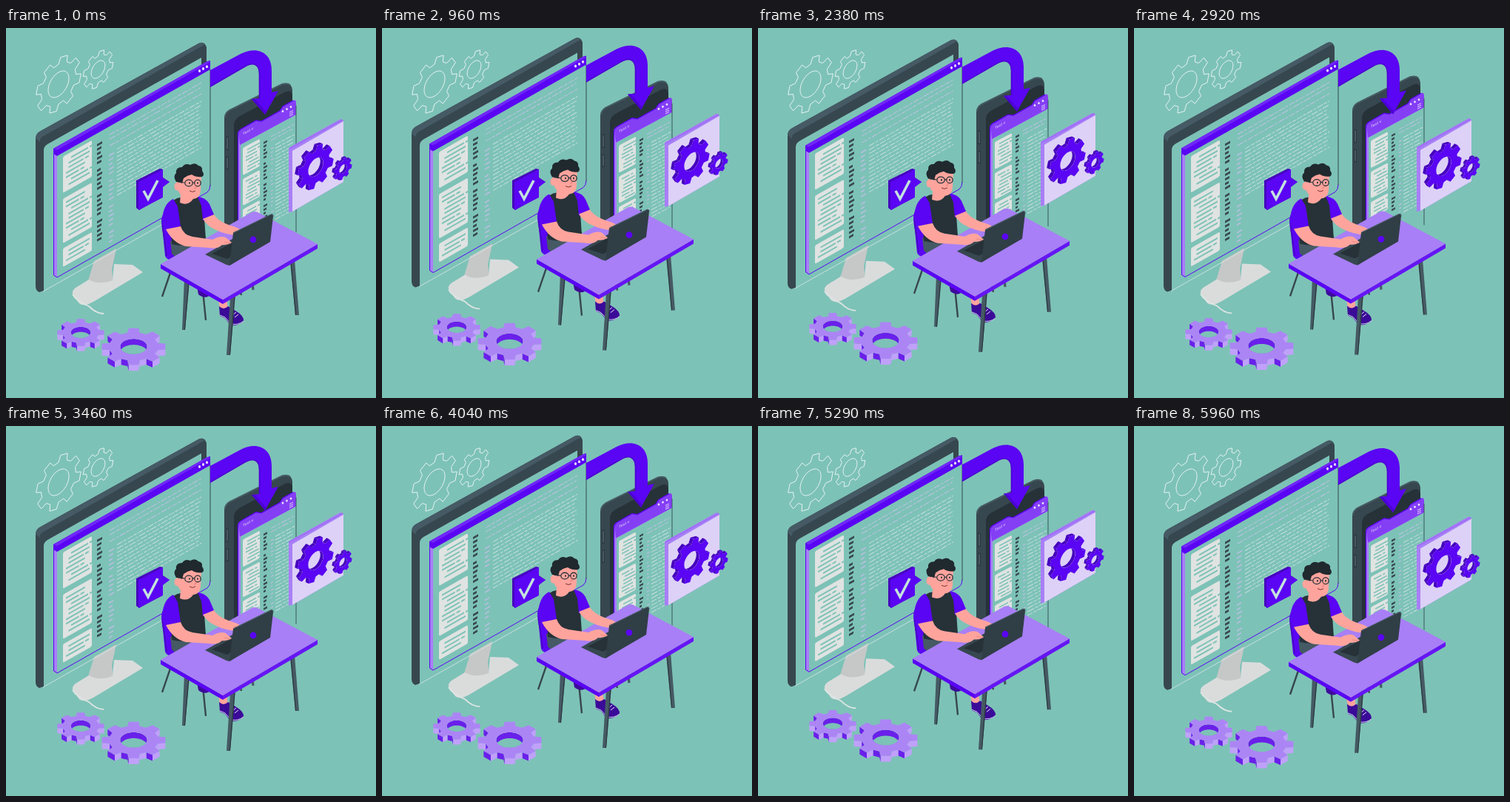
Write an HTML page with a canvas that moves like this. It is 500 by 500 pixels and loops after 6 s.

```html
<!DOCTYPE html>
<html lang="en">
<head>
<meta charset="utf-8">
<title>Developer at work</title>
<style>
html, body { margin: 0; width: 100%; height: 100%; overflow: hidden; background: #7dc2b7; }
canvas { display: block; width: 500px; height: 500px; }
</style>
</head>
<body>
<canvas id="stage" width="500" height="500"></canvas>
<script>
const c = document.getElementById('stage').getContext('2d');
const BG = '#7dc2b7', VIOLET = '#5a05f3', DEEP = '#4503bd', LILAC = '#a87ff6', PALE = '#ddd1f7',
  DARK = '#263238', SLATE = '#37474f', STEEL = '#455a64', SKIN = '#ffa49d', PAPER = '#dfe3e1';
const WALL = [.87, -.5, 0, 1], FLOOR = [.87, -.5, .87, .5];

const fill = (d, color) => { c.fillStyle = color; c.fill(new Path2D(d)); };
const line = (d, color, width = 1) => {
  c.strokeStyle = color;
  c.lineWidth = width;
  c.stroke(new Path2D(d));
};
const oval = (x, y, rx, ry, color) => {
  c.beginPath();
  c.ellipse(x, y, rx, ry, 0, 0, 7);
  c.fillStyle = color;
  c.fill();
};
const box = (x, y, w, h, color, r = 0) => {
  c.beginPath();
  c.roundRect(x, y, w, h, r);
  c.fillStyle = color;
  c.fill();
};

// Draws in a frame whose x axis climbs along the isometric wall.
function onWall(x, y, draw, slope = -.567) {
  c.save();
  c.transform(1, slope, 0, 1, x, y);
  draw();
  c.restore();
}

// Draws with a linear up-and-down drift of 10 px.
function float(t, period, draw) {
  c.save();
  c.translate(0, -10 * (1 - Math.abs(1 - 2 * (t / period % 1))));
  draw();
  c.restore();
}

function ring(cx, cy, m, polar) {
  return polar.map(([r, a]) => {
    const u = r * Math.cos(a), v = r * Math.sin(a);
    return [cx + m[0] * u + m[2] * v, cy + m[1] * u + m[3] * v];
  });
}
const toPath = pts => 'M' + pts.map(p => p.join(' ')).join('L') + 'Z';

function gearShape(cx, cy, r, m, hole, turn) {
  const teeth = 8, step = 2 * Math.PI / teeth, rim = [], bore = [];
  for (let i = 0; i < teeth; i++)
    for (const [k, s] of [[-.32, .77], [-.2, 1], [.2, 1], [.32, .77]])
      rim.push([r * s, (i + k) * step + turn]);
  for (let i = 0; i < 40; i++) bore.push([r * hole, i * Math.PI / 20]);
  return [ring(cx, cy, m, rim), ring(cx, cy, m, bore)];
}

function solidGear(cx, cy, r, m, turn, [ex, ey], face, light, dark, back) {
  const [rim, bore] = gearShape(cx, cy, r, m, .42, turn);
  rim.forEach((p, i) => {
    const q = rim[(i + 1) % rim.length];
    const nx = q[1] - p[1], ny = p[0] - q[0];
    if (nx * ex + ny * ey > 0)
      fill(toPath([p, q, [q[0] + ex, q[1] + ey], [p[0] + ex, p[1] + ey]]), nx < -1 ? dark : light);
  });
  const hole = toPath(bore);
  c.save();
  c.clip(new Path2D(hole));
  fill(hole, dark);
  c.translate(ex, ey);
  fill(hole, back);
  c.restore();
  c.fillStyle = face;
  c.fill(new Path2D(toPath(rim) + hole), 'evenodd');
}

function lineGear(cx, cy, r) {
  gearShape(cx, cy, r, WALL, .46, .25).forEach(p => line(toPath(p), '#e6f3f1', 1));
}

// A sheet of short text bars.
function note(x, y, w, h, gap, seed) {
  box(x, y, w, h, PAPER, 2);
  for (let i = 0, yy = y + gap; yy < y + h - 3; i++, yy += gap) {
    const k = (i + seed) * 7 % 5, left = x + 4 + (k % 3) * w * .09;
    const len = w * (.45 + k * .07);
    box(left, yy, len, gap * .38, BG);
    if (k < 3) box(left + len + 2, yy, w * .13, gap * .38, BG);
  }
}

function marks(x, y, w, n, step, color, h) {
  for (let i = 0; i < n; i++)
    box(x, y + i * step + Math.floor(i / 5) * step * .7, w - i % 3, h, color);
}

// Rows of broken thin text lines.
function rules(x, y, w, n, step, color = '#d3e4e6') {
  c.save();
  for (let i = 0; i < n; i++) {
    c.setLineDash([7 + i % 3, 1.5, 4, 1.5]);
    line(`M${x} ${y + i * step}h${w - i * 5 % 4}`, color, .9);
  }
  c.restore();
}

function monitor() {
  fill('M110 345 L119 315 L149 298 L143 326 L145 343 L120 350Z', '#c6c8c8');
  fill('M90 359 Q89 355 94 351 L112 340 Q125 348 144 341 L146 319 L171 320 L185 330 L118 370 Q104 378 98 371Z', '#dadcdc');
  line('M90 360 Q95 369 112 376 Q122 386 132 386', '#dfe6e4', 1.8);
  fill('M40 151 Q40 143 47 139 L260 21 Q268 17 271 26 L271 47 L264 50 L264 40 L56 157 Q51 160 51 165 L51 355 L45 357 Q40 355 40 349Z', SLATE);
  fill('M40 149 Q40 142 47 139 L260 21 Q266 18 269 22 L49 147 Q45 150 46 154Z', STEEL);
  line('M50 356 L226 257', '#d8e9e6', .8);

  fill('M64 163 L69 171 L69 337 L64 334Z', LILAC);
  line('M64.5 164 V334 L69 337 L272 222 Q276 219 276 212', VIOLET, 1);
  line('M276 56 V213', '#354d59', 1);
  fill('M64 163 L272 45 L276 44 L276 56 L69 173 L64 170Z', VIOLET);
  fill('M64 163 L272 45 L276 46 L69 165Z', '#7027f7');
  for (let i = 0; i < 3; i++) oval(261.5 + i * 5, 58 - i * 2.9, 1.6, 2, '#e9e0fc');

  onWall(77, 174, () => {
    note(0, 0, 39, 49, 5.8, 1);
    note(0, 57, 39, 60, 5.8, 4);
    note(0, 124, 39, 25, 5.8, 2);
    marks(46, 9, 7, 20, 6.1, SLATE, 3);
    rules(63, 6, 124, 2, 6, '#cbc3ec');
    rules(63, 21, 124, 1, 5, '#cbc3ec');
    marks(62, 33, 7, 18, 6.1, '#b4bfdd', 2);
    rules(73, 31, 114, 13, 5.2);
  });
}

function check() {
  fill('M176 206 L208 190 L212 191 L212 202 L221 208 L212 214 L212 228 L180 246 L176 243Z', DEEP);
  fill('M179 208 L212 191 L212 203 L221 208 L212 215 L212 229 L179 246Z', VIOLET);
  line('M186 220 L192 231 L205 206', '#c3e2de', 3.6);
}

function phone() {
  fill('M295 122 Q295 115 302 111 L373 76 Q386 72 387 84 L387 100 L316 145 V290 H295Z', SLATE);
  fill('M308 130 Q309 123 316 119 L376 87 Q386 82 387 92 L387 104 L316 145 V290 H308Z', DARK);
  line('M296 121 Q296 115 302 111 L373 76 Q380 74 384 77', STEEL, 2);
  line('M299 147 V165 M299 174 V191', DARK, 4);
  line('M299 148 V164 M299 175 V190', STEEL, 2.4);

  fill('M316 145 L392 105 V290 H316Z', BG);
  fill('M313 143 Q313 139 317 137 L338 125 L345 126 L370 112 L374 106 L388 98 Q392 96 392 102 L392 117 L317 158 V290 H313Z', LILAC);
  fill('M314 142 Q314 139 317 137 L338 125 L345 126 L370 112 L374 106 L388 98 Q392 96 392 102 L392 117 L316 158Z', '#843ff5');
  line('M313.5 290 V143 Q314 139 317 137 L338 125 L345 126 L370 112 L374 106 L388 98', VIOLET, 1.3);
  line('M392 105 V276', '#354d59', .9);
  for (let i = 0; i < 3; i++) oval(374 + i * 5.5, 112.5 - i * 3, 1.3, 1.5, '#eee6fd');
  line('M383 114 l5 -2.5 M383 116.5 l5 -2.5 M383 119 l5 -2.5', '#eee6fd', .9);
  onWall(320, 145, () => {
    c.fillStyle = '#eee6fd';
    c.font = '5px Inter, sans-serif';
    c.fillText('Text v', 0, 0);
  });
  onWall(320, 162, () => {
    note(0, 0, 23, 37, 4.6, 2);
    note(0, 42, 23, 36, 4.6, 0);
    note(0, 83, 23, 22, 4.6, 3);
    marks(28, 7, 5, 19, 5, SLATE, 2.6);
    rules(38, 5, 31, 2, 5, '#cbc3ec');
    marks(38, 21, 4, 18, 5, '#b4bfdd', 1.5);
    rules(44, 19, 26, 22, 4.8);
  }, -.53);
}

function arrow() {
  fill('M276 57 L317 35 C338 24 359 32 359 57 L359 87 L368 85 L350 117 L332 96 L342 95 V62 C342 50 335 45 323 52 L276 80Z', VIOLET);
  line('M276 79 L323 52 C335 45 342.5 50 342.5 62 V95', '#4c03d2', 1.6);
  fill('M332 96 L336 96 L352 114 L350 117Z', '#4c03d2');
}

function head() {
  fill('M231 205 C230 216 233 222 236 225 L235 236 Q246 241 253 231 C260 230 263 226 263 217 L264 198 L240 196Z', SKIN);
  oval(231.5, 214, 4, 5.5, SKIN);
  fill('M230 208 Q225 200 230 196 Q229 188 238 188 Q242 182 249 185 Q256 181 260 186 Q266 187 265 193 Q269 198 265 201 Q257 202 251 198 Q245 199 240 203 L238 210 L234 208Z', '#1f292e');
  c.strokeStyle = DARK;
  c.lineWidth = 1.3;
  for (const [x, r] of [[247, 5.2], [259, 4.2]]) {
    c.beginPath();
    c.ellipse(x, 209.5, r, 4.3, 0, 0, 7);
    c.stroke();
  }
  line('M252 209 L255 209 M241 209 L232 208', DARK, 1.2);
  oval(248, 209.5, 1, 1.3, DARK);
  oval(259, 209.5, 1, 1.3, DARK);
  line('M255 211 L257 216 L254 217', '#e0736f', .8);
  line('M248 220 Q252 223 256 220', '#7e3535', 1);
}

function personAndDesk() {
  // chair, lower legs and far table leg
  line('M223 328 L211 363 M266 355 L270 395 M315 348 L318 361', SLATE, 2.4);
  line('M332 335 L334 354', STEEL, 3.2);
  fill('M213 252 Q208 255 212 278 L215 308 Q218 316 232 313 L228 270Z', VIOLET);
  line('M213 253 Q209 257 214 284 L217 308', DEEP, 1.5);
  fill('M258 349 L278 359 Q270 368 260 360Z', '#3d0a9c');
  fill('M286 361 L298 366 L300 380 L289 379Z', SKIN);
  fill('M288 376 Q294 382 300 376 L310 382 Q322 389 321 396 Q312 404 303 401 L296 392 L289 389Z', '#3a0b98');
  line('M289 388 L296 391 L304 400 Q314 402 321 396', '#d9ccf6', 1);
  line('M302 386 L308 381 M305 389 L311 384 M309 391 L314 387', '#eee6fd', 1);

  // body
  fill('M222 288 L270 282 L272 305 L238 318 L224 305Z', STEEL);
  fill('M221 240 Q226 230 236 229 Q246 236 256 228 Q265 229 267 242 L270 286 Q246 298 224 292Z', DARK);
  fill('M226 231 Q213 237 211 258 Q211 268 215 273 L236 268 L232 241Z', VIOLET);
  fill('M259 228 Q270 229 275 238 L281 252 Q275 260 266 260 L264 240Z', VIOLET);
  head();

  // table
  fill('M241 338 L248 342 L242 408 L238 408Z', STEEL);
  fill('M303 364 L310 360 L303 442 L298 442Z', STEEL);
  fill('M384 316 L390 313 L396 388 L391 388Z', STEEL);
  line('M247 342 L241.5 408 M309 362 L302.5 442 M385 316 L391.5 388', DARK, 1);
  fill('M209 319 L293 367 V373 L209 325Z', VIOLET);
  fill('M293 367 L421 292 V298 L293 373Z', '#6615f4');
  fill('M209 319 L332 249 Q336 247 340 249 L421 292 L293 367Z', LILAC);

  // laptop and arms
  fill('M269 306 L306 285 L344 294 L302 321 L298 320Z', SLATE);
  fill('M278 305 L306 290 L324 295 L299 312Z', DARK);
  fill('M266 258 L281 252 Q287 262 307 268 Q315 270 319 275 L312 280 Q296 279 284 273 Q272 268 266 258Z', SKIN);
  fill('M216 272 L236 268 Q240 280 252 282 L279 286 Q290 280 297 283 L305 290 Q299 294 292 293 Q286 299 275 297 L243 295 Q226 291 216 272Z', SKIN);
  line('M295 289 L304 291 M308 274 L316 277', '#e57f7b', .8);
  fill('M307 277 L358 252 Q361 251 361 255 L357 289 L302 321Z', '#303e46');
  line('M307 277 L358 252 Q361 251 361 255', STEEL, 1.2);
  oval(334, 286, 4.4, 4.4, VIOLET);
}

function card() {
  fill('M382 162 L452 123 L456 125 L456 208 L387 248 L382 249Z', LILAC);
  fill('M387 166 L456 126 V208 L387 248Z', PALE);
  line('M383 163 L455 124', '#9c6cf8', 1.5);
  solidGear(418.5, 188, 28, WALL, .25, [-4, -2], VIOLET, '#4d04d3', DEEP, PALE);
  solidGear(455.5, 190.5, 14, WALL, .25, [-3, -1.5], VIOLET, '#4d04d3', DEEP, PALE);
}

function floorGears() {
  solidGear(101, 411.5, 26, FLOOR, 0, [0, 7], '#ac85f5', '#c0a1fa', '#6a20ea', BG);
  solidGear(172.5, 430.5, 35.3, FLOOR, 0, [0, 8], '#ac85f5', '#c0a1fa', '#6a20ea', BG);
}

function draw(t) {
  c.fillStyle = BG;
  c.fillRect(0, 0, 500, 500);
  lineGear(71, 76, 35);
  lineGear(124.5, 56, 23.5);
  float(t, 3000, monitor);
  check();
  float(t, 6000, phone);
  float(t, 3000, arrow);
  float(t, 1500, card);
  float(t, 3000, personAndDesk);
  float(t, 1500, floorGears);
  requestAnimationFrame(draw);
}
requestAnimationFrame(draw);
</script>
</body>
</html>
```
